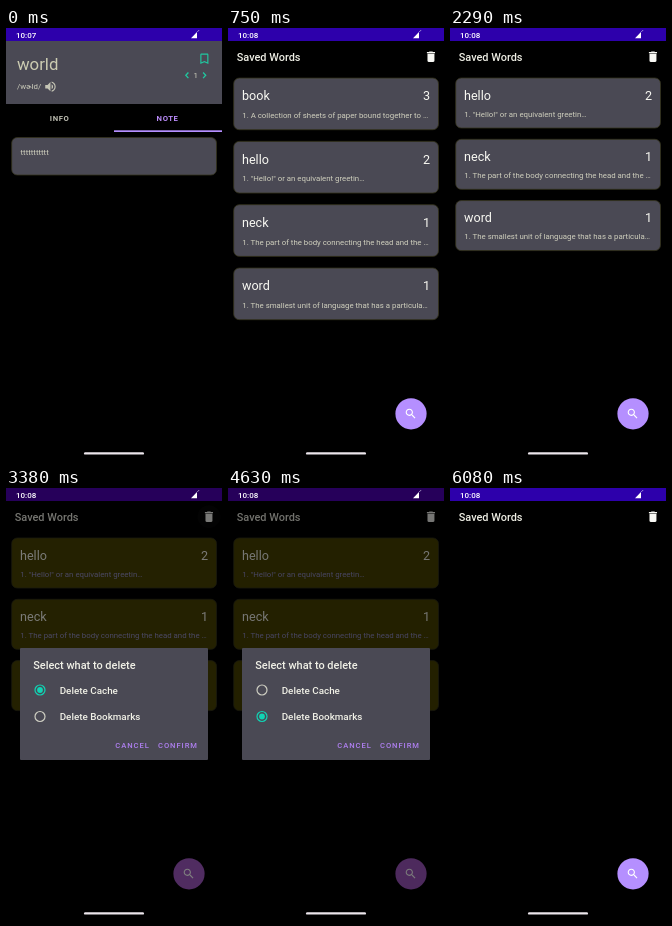
Recreate the animation shown at these times as an HTML page. Size 216x432 px, loop 6180 ms.

```html
<!DOCTYPE html>
<html lang="en">
<head>
<meta charset="utf-8">
<title>Saved words</title>
<style>
  html, body { margin: 0; width: 100%; height: 100%; overflow: hidden; background: #000; }
  svg { display: block; width: 100vw; height: 100vh; font-family: Roboto, "Noto Sans", sans-serif; }
  .med { font-weight: 500; }
  .title { font-size: 10.95px; font-weight: 500; fill: #eeeee4; }
  .word { font-size: 12.6px; fill: #f8f8f2; }
  .small { font-size: 7.85px; fill: #d0d0be; }
  .tab { font-size: 7.7px; font-weight: 700; letter-spacing: .6px; }
  .option { font-size: 9.85px; font-weight: 500; }
  .button { font-size: 7.6px; font-weight: 500; letter-spacing: .95px; }
  .card { stroke: #34331c; stroke-width: .8; }
  .end { text-anchor: end; }
  #dialog .title { fill: inherit; }
</style>
</head>
<body>
<svg viewBox="0 0 216 432">
  <rect width="216" height="432"/>

  <g id="list">
    <text class="title" x="8.7" y="33">Saved Words</text>
    <circle id="trashTap" cx="203" cy="28.7" r="11.5" fill="#fff"/>
    <path transform="translate(196 21.7) scale(.58)" fill="#f8f8f4" d="M6 19c0 1.1.9 2 2 2h8c1.1 0 2-.9 2-2V7H6v12zM19 4h-3.5l-1-1h-5l-1 1H5v2h14V4z"/>
    <g id="cards"></g>
    <circle id="search" cx="183" cy="385.8" r="15.6"/>
    <path transform="translate(176 379) scale(.56)" fill="#fff" d="M15.5 14h-.79l-.28-.27C15.41 12.59 16 11.11 16 9.5 16 5.91 13.09 3 9.5 3S3 5.91 3 9.5 5.91 16 9.5 16c1.61 0 3.09-.59 4.23-1.57l.27.28v.79l5 4.99L20.49 19l-4.99-5zm-6 0C7.01 14 5 11.99 5 9.5S7.01 5 9.5 5 14 7.01 14 9.5 11.99 14 9.5 14z"/>
  </g>

  <g id="note">
    <rect width="216" height="432"/>
    <rect y="13" width="216" height="63" fill="#4a4954"/>
    <text x="11" y="42" font-size="16.8" fill="#ccccb2">world</text>
    <text class="small" x="11" y="61">/wɚld/</text>
    <path transform="translate(37.5 51.7) scale(.58)" fill="#c4c4b4" d="M3 9v6h4l5 5V4L7 9H3zm13.5 3c0-1.77-1.02-3.29-2.5-4.03v8.05c1.48-.73 2.5-2.25 2.5-4.02zM14 3.23v2.06c2.89.86 5 3.54 5 6.71s-2.11 5.85-5 6.71v2.06c4.01-.91 7-4.49 7-8.77s-2.99-7.86-7-8.77z"/>
    <path transform="translate(191.4 23.8) scale(.58)" fill="#20c8a0" d="M17 3H7c-1.1 0-2 .9-2 2v16l7-3 7 3V5c0-1.1-.9-2-2-2zm0 15-5-2.18L7 18V5h10v13z"/>
    <path d="M182.4 44.5l-2.6 2.8 2.6 2.8M197.1 44.5l2.6 2.8-2.6 2.8" fill="none" stroke="#20c8a0" stroke-width="1.3"/>
    <text class="small" x="187.4" y="49.6">1</text>
    <text class="tab" x="43.8" y="93" fill="#bcbcb0">INFO</text>
    <text class="tab" x="150.6" y="93" fill="#b98af8">NOTE</text>
    <rect x="108" y="102.3" width="108" height="1.7" fill="#b58fff"/>
    <rect class="card" x="5.7" y="109.5" width="204.8" height="37.5" rx="5.5" fill="#4a4954"/>
    <text class="small" x="14.5" y="126.5">ttttttttttt</text>
  </g>

  <rect id="shade" width="216" height="432"/>

  <rect id="status" width="216" height="13"/>
  <text id="clock" class="med" x="10" y="9.8" font-size="8" fill="#fff"></text>
  <path d="M185 10.2L191 4V10.2z" fill="#fff"/>
  <path d="M191.4 3.8L193 2.2" stroke="#d8d0f0" stroke-width=".8"/>

  <g id="dialog">
    <rect id="panel" x="14" y="160" width="188" height="112" rx="1"/>
    <text class="title" x="27.2" y="181.3">Select what to delete</text>
    <g id="options"></g>
    <rect id="confirmTap" x="147" y="247" width="49" height="19" rx="2" fill="#b080f2"/>
    <g id="buttons">
      <text class="button" x="109.3" y="260">CANCEL</text>
      <text class="button" x="152" y="260">CONFIRM</text>
    </g>
  </g>

  <rect x="78" y="424.2" width="60" height="2.4" rx="1.2" fill="#ece6ec"/>
</svg>
<script>
const LOOP = 6180, PITCH = 61.3, SHADE = .52;
const NOTE_END = 40, CLEARED = 5075;
const $ = id => document.getElementById(id);

const words = [
  ['book', 3, '1. A collection of sheets of paper bound together to …'],
  ['hello', 2, '1. "Hello!" or an equivalent greetin…'],
  ['neck', 1, '1. The part of the body connecting the head and the …'],
  ['word', 1, '1. The smallest unit of language that has a particula…']
];

$('cards').innerHTML = words.map(([word, count, text]) => `<g>
  <rect class="card" x="5.7" y="50" width="204.8" height="50" rx="5.5"/>
  <text class="word" x="14" y="71.6">${word}</text>
  <text class="word end" x="202" y="71.6">${count}</text>
  <text class="small" x="14.3" y="88.8">${text}</text></g>`).join('');

$('options').innerHTML = ['Delete Cache', 'Delete Bookmarks'].map((label, i) => {
  const y = 202 + i * 26.5;
  return `<circle class="halo" cx="34" cy="${y}" r="10" fill="#10d4b4"/>
    <circle class="ring" cx="34" cy="${y}" r="5" fill="none" stroke-width="1.2"/>
    <circle class="dot" cx="34" cy="${y}"/>
    <text class="option" x="53.7" y="${y + 3.7}">${label}</text>`;
}).join('');

// Each track lists [time, value] points.
const tracks = {
  stretch: [[350, 1], [720, 1.033], [830, 1.033], [1250, 1]],
  swipe: [[1710, 0], [1980, 216]],
  closeUp: [[1990, 0], [2240, 1]],
  trashTap: [[3040, 0], [3130, .2], [3240, .2], [3420, 0]],
  shade: [[3200, 0], [3400, SHADE], [5070, SHADE], [5130, .33], [5215, 0]],
  dialog: [[3210, 0], [3380, 1], [5070, 1], [5130, .56], [5215, 0]],
  tint: [[5070, 0], [5125, 1]],
  halo: [[4190, 0], [4240, .2], [4340, .2], [4440, 0]],
  choice: [[4230, 0], [4350, 1]],
  confirmTap: [[4880, 0], [4960, .2], [5070, 0]]
};

const ease = p => p * p * (3 - 2 * p);

function at(name, t) {
  const track = tracks[name];
  if (t <= track[0][0]) return track[0][1];
  for (let i = 1; i < track.length; i++) {
    const [t0, a] = track[i - 1], [t1, b] = track[i];
    if (t < t1) return a + (b - a) * ease((t - t0) / (t1 - t0));
  }
  return track[track.length - 1][1];
}

// Pairs of [normal, dimmed or fading] colours.
const colours = {
  card: [[74, 73, 84], [73, 67, 0]],
  text: [[208, 208, 190], [150, 145, 205]],
  search: [[181, 143, 255], [162, 88, 196]],
  status: [[45, 0, 171], [38, 0, 90]],
  panel: [[74, 73, 84], [62, 58, 0]],
  label: [[240, 240, 230], [172, 162, 205]],
  button: [[176, 128, 242], [105, 60, 200]],
  on: [[16, 212, 180], [0, 125, 175]],
  off: [[206, 206, 194], [150, 140, 190]]
};

const blend = (a, b, p) => a.map((v, i) => Math.round(v + (b[i] - v) * p));
const colour = (name, p) => blend(...colours[name], p);
const rgb = c => `rgb(${c})`;
const set = (el, attr, value) => el.setAttribute(attr, value);

const cards = [...$('cards').children];
const [halos, rings, dots] = ['halo', 'ring', 'dot'].map(c => document.querySelectorAll('.' + c));

function draw(t) {
  const shade = at('shade', t), dim = shade / SHADE;
  const tint = at('tint', t), choice = at('choice', t), closeUp = at('closeUp', t);
  const noteOpen = t < NOTE_END;

  set($('note'), 'visibility', noteOpen ? 'visible' : 'hidden');
  $('clock').textContent = noteOpen ? '10:07' : '10:08';

  const s = at('stretch', t);
  set($('cards'), 'transform', `translate(0 ${48 * (1 - s)}) scale(1 ${s})`);
  set($('cards'), 'visibility', t < CLEARED ? 'visible' : 'hidden');
  cards.forEach((card, i) => {
    const x = i ? 0 : -at('swipe', t);
    const y = i ? (i - closeUp) * PITCH : 0;
    set(card, 'transform', `translate(${x} ${y})`);
    set(card.firstElementChild, 'fill', rgb(colour('card', dim)));
    card.lastElementChild.style.fill = rgb(colour('text', dim));
  });

  set($('search'), 'fill', rgb(colour('search', dim)));
  set($('status'), 'fill', rgb(colour('status', Math.min(1, dim * 1.6))));
  set($('trashTap'), 'opacity', at('trashTap', t));
  set($('shade'), 'opacity', shade);

  set($('dialog'), 'opacity', at('dialog', t));
  set($('dialog'), 'fill', rgb(colour('label', tint)));
  set($('panel'), 'fill', rgb(colour('panel', tint)));
  set($('buttons'), 'fill', rgb(colour('button', tint)));
  set($('confirmTap'), 'opacity', at('confirmTap', t));

  const on = colour('on', tint), off = colour('off', tint);
  [1 - choice, choice].forEach((picked, i) => {
    set(rings[i], 'stroke', rgb(blend(off, on, picked)));
    set(dots[i], 'fill', rgb(on));
    set(dots[i], 'r', 2.9 * picked);
    set(halos[i], 'opacity', i ? at('halo', t) : 0);
  });
}

let start;
function frame(now) {
  start ??= now;
  draw((now - start) % LOOP);
  requestAnimationFrame(frame);
}
draw(0);
requestAnimationFrame(frame);
</script>
</body>
</html>
```
